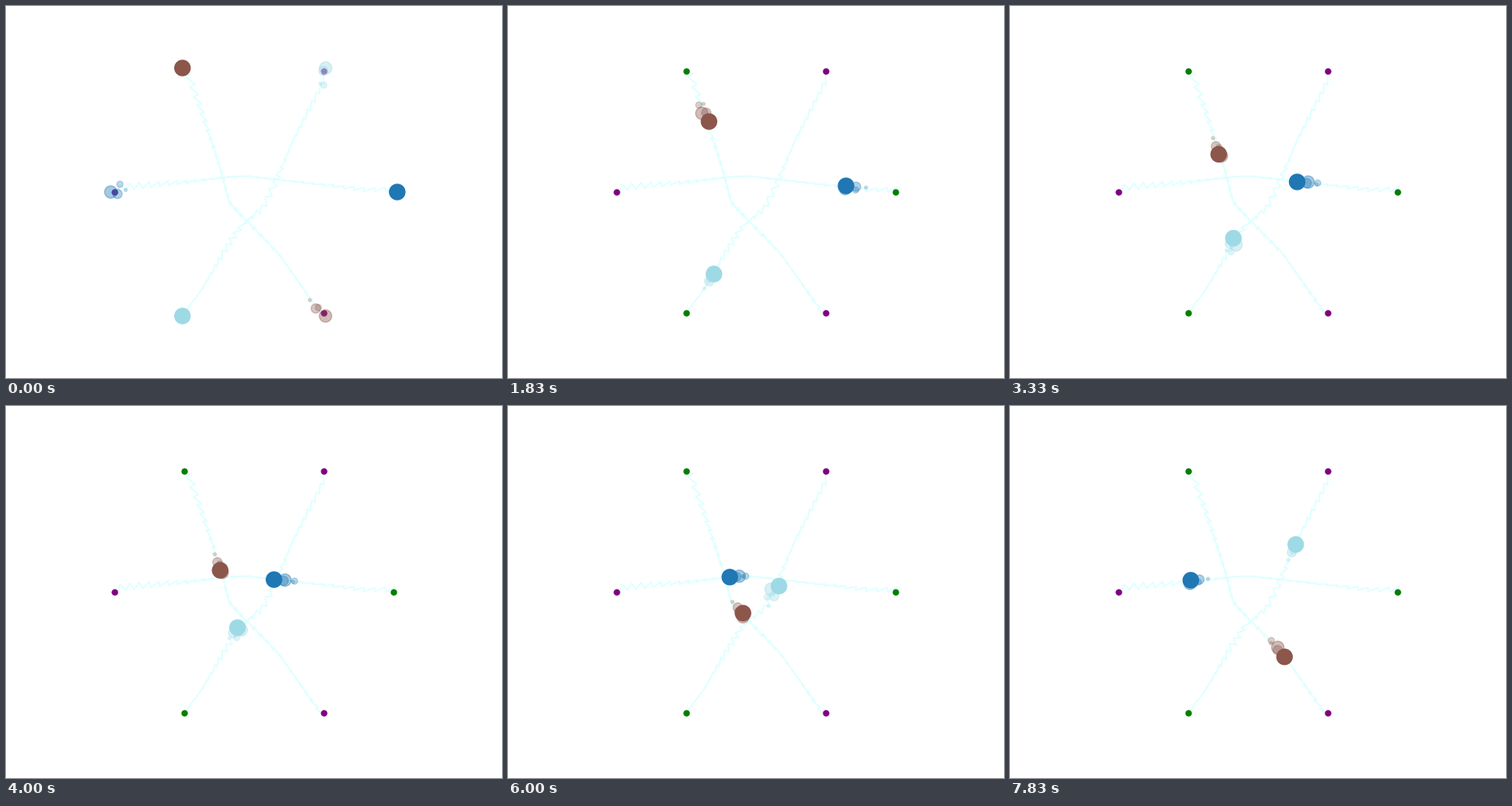
A matplotlib script that plays this animation: 640 by 480 pixels, repeating every 8000 ms.

```python
import numpy as np
import matplotlib.pyplot as plt
from matplotlib.animation import FuncAnimation
from matplotlib.colors import to_rgba

W, H, DPI = 640, 480, 100
RUN = 64            # steps of a full run from start to goal
RATE = 6            # steps per second
LOOP, TICK = 8000, 20   # ms
TAIL = 4

steps = np.arange(RUN)
sign = np.where(steps % 2, 1, -1)
KEYS = [0, 6, 17, 24, 31, 36, 47, 61, 63]


def zigzag(points, amp, angle):
    """Path through points at the key steps, with a step-by-step wobble.

    Odd steps lean along the angle (degrees), even steps against it.
    """
    turn = np.radians(angle)
    wobble = (sign * amp * np.array([np.cos(turn), np.sin(turn)])).T
    knots = np.array(points) - wobble[KEYS]
    base = np.column_stack([np.interp(steps, KEYS, k) for k in knots.T])
    return base + wobble


blue = zigzag([(504.8, 240), (461.8, 239.3), (397, 228.4), (345.8, 224),
               (315.2, 219.5), (286.2, 220.8), (233.3, 224.8), (147, 230),
               (135.2, 240)],
              amp=4, angle=-0.085 * (steps - 26) ** 2)

brown = zigzag([(227.7, 80), (242.3, 117.3), (269.7, 182.8), (276.3, 212),
                (289.7, 257.3), (303.2, 267.3), (354.2, 323.7), (403, 389),
                (412.3, 400)],
               amp=4.5, angle=68 - 0.055 * (steps - 35) ** 2)

cyan = zigzag([(227.7, 400), (254.8, 362.7), (285.2, 317.3), (298.7, 286),
               (330, 257.2), (349.7, 232.3), (368.7, 178.7), (410, 102),
               (412.5, 80)],
              amp=3.8, angle=-70 - 220 * np.tanh((steps - 28) / 16))

AGENTS = [(blue, "#1f77b4"), (brown, "#8c564b"), (cyan, "#9edae5")]

fig = plt.figure(figsize=(W / DPI, H / DPI), dpi=DPI, facecolor="white")
ax = fig.add_axes([0, 0, 1, 1])
ax.set_xlim(0, W)
ax.set_ylim(H, 0)
ax.axis("off")


def markers(degrees, color):
    angle = np.radians(degrees)
    ax.plot(W / 2 + 180 * np.cos(angle), H / 2 + 180 * np.sin(angle),
            "o", ms=5, color=color, zorder=2)


for path, _ in AGENTS:
    ax.plot(*path[1:].T, color="lightcyan", lw=1.5, zorder=1)
markers([0, 120, 240], "green")
markers([60, 180, 300], "purple")

# Oldest tail dot first, so the agent itself is drawn on top.
age = np.arange(TAIL, -1, -1)
sizes = (14.4 * (1 - age / (TAIL + 1))) ** 2
alphas = np.where(age == 0, 1, 0.46 - 0.06 * age)

dots = []
for i, (path, color) in enumerate(AGENTS):
    rgba = [to_rgba(color, a) for a in alphas]
    dots.append(ax.scatter(*path[-age].T, s=sizes, facecolors=rgba,
                           edgecolors=rgba, linewidths=1, zorder=3 + i))


def draw(tick):
    # Steps change on the nearest 10 ms, between two ticks.
    step = int((tick * TICK + 15) * RATE / 1000)
    for dot, (path, _) in zip(dots, AGENTS):
        dot.set_offsets(path[(step - age) % RUN])
    return dots


anim = FuncAnimation(fig, draw, frames=LOOP // TICK, interval=TICK,
                     init_func=lambda: draw(0), repeat=True, repeat_delay=0)
plt.show()
```
